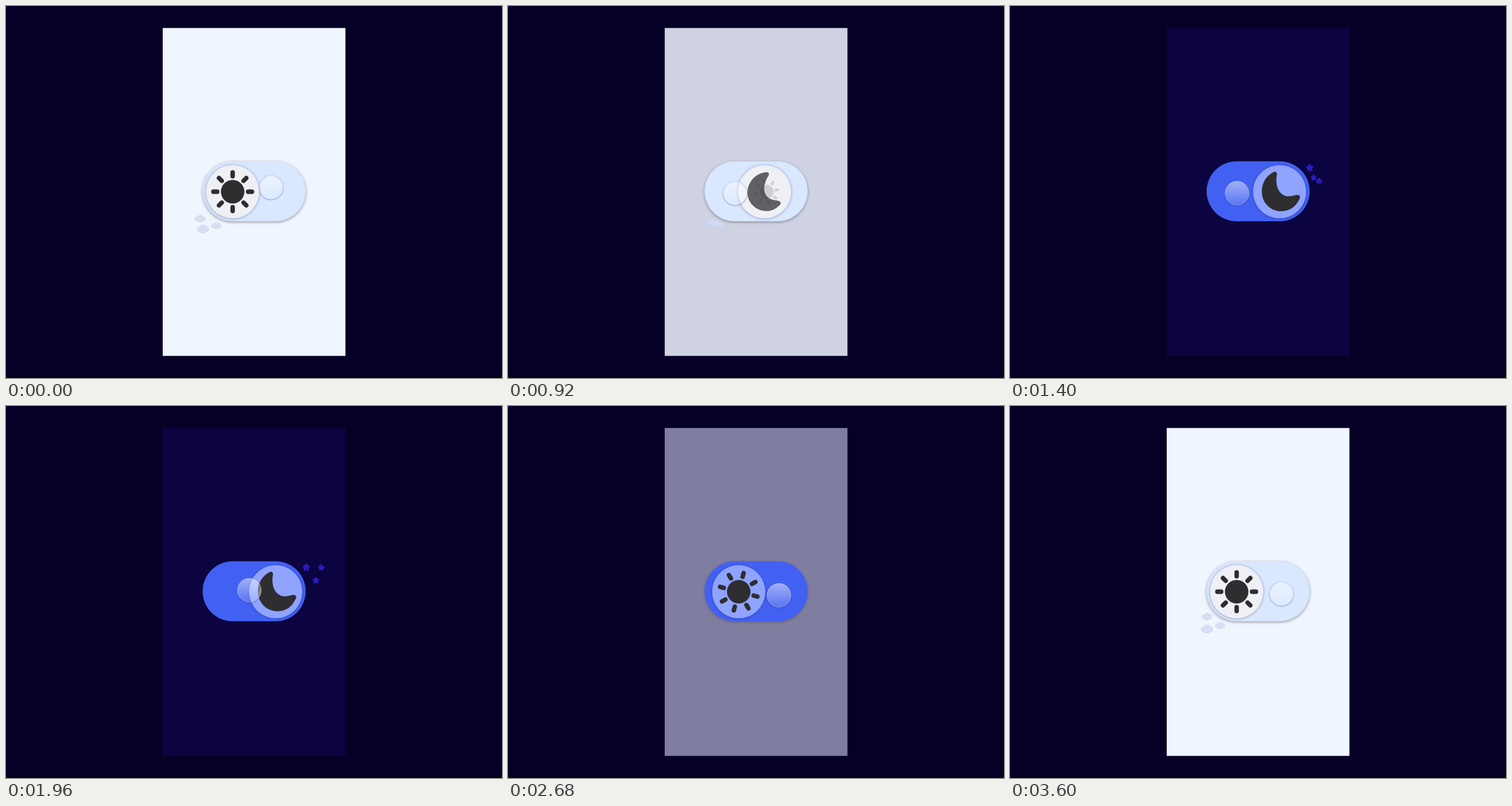
An HTML page with a canvas for the animation above (3.64 s loop, 864 px wide and 648 px high).

```html
<!DOCTYPE html>
<html lang="en">
<head>
<meta charset="utf-8">
<title>Day and night switch</title>
<style>
html, body { margin: 0; width: 100%; height: 100%; overflow: hidden; background: #060026; }
canvas { display: block; }
</style>
</head>
<body>
<canvas id="stage" width="864" height="648"></canvas>
<script>
const ctx = document.getElementById('stage').getContext('2d');
const LOOP = 3640, TO_NIGHT = 800, TO_DAY = 2440;
const INK = '#2e2d30';

const clamp = v => Math.max(0, Math.min(1, v));
const smooth = v => (1 - Math.cos(Math.PI * clamp(v))) / 2;
const mix = (a, b, k) => a + (b - a) * k;
const rgb = (a, b, k) => `rgb(${a.map((v, i) => Math.round(mix(v, b[i], k)))})`;
const glide = age => age < 0 ? 0 : 1 - Math.exp(-0.0098 * age);
const spring = age => age < 0 ? 0 : 1 - Math.exp(-0.0035 * age) * Math.cos(age * Math.PI / 200);

const moon = new Path2D('M-11-34C-6-37-4-32-5-28C-8-10-1 7 15 8C22 8 26 6 31 5.5' +
  'C36 5.5 37 10 34 14C28 27 17 34 3 34C-16 34-31 19-31-1C-31-15-23-28-11-34Z');

const sun = new Path2D();
sun.arc(0, 0, 20.5, 0, 7);
const ray = new Path2D();
ray.roundRect(-3.9, -37.5, 7.8, 14.5, 3.9);
for (let a = 0; a < 360; a += 45) sun.addPath(ray, new DOMMatrix().rotate(a));

const cloud = new Path2D();
for (const [x, y, rx, ry] of [[-.24, .02, .26, .2], [.02, -.1, .27, .23], [.27, 0, .23, .22], [.02, .12, .34, .21]]) {
  cloud.moveTo(x + rx, y);
  cloud.ellipse(x, y, rx, ry, 0, 0, 7);
}

const star = new Path2D();
for (let i = 0; i < 10; i++) {
  const r = i % 2 ? 0.55 : 0.9, a = i * Math.PI / 5 - Math.PI / 2;
  star.lineTo(r * Math.cos(a), r * Math.sin(a));
}
star.closePath();

// home x, y, hidden x, y, size, appearance time
const clouds = [
  [338, 370, 368, 348, 18, 3160],
  [343, 388, 362, 374, 21, 2900],
  [366, 382, 371, 380, 17, 2900]
];
const stars = [
  [522, 282, 504, 296, 6.8, 1300],
  [545, 285, 505, 320, 5.8, 1335],
  [538, 305, 508, 322, 5.8, 1300]
];

function place(path, x, y, turn, size) {
  const placed = new Path2D();
  placed.addPath(path, new DOMMatrix().translate(x, y).rotate(turn).scale(size));
  return placed;
}

function fill(path, style, alpha = 1) {
  ctx.globalAlpha = alpha;
  ctx.fillStyle = style;
  ctx.fill(path);
  ctx.globalAlpha = 1;
}

function shadowed(color, blur, y, draw) {
  ctx.save();
  ctx.shadowColor = color;
  ctx.shadowBlur = blur;
  ctx.shadowOffsetY = y;
  draw();
  ctx.restore();
}

function circle(x, y, r) {
  const path = new Path2D();
  path.arc(x, y, r, 0, 7);
  return path;
}

function scatter(items, t, leave, paint) {
  for (const [x, y, hx, hy, size, start] of items) {
    const shown = t >= start || (start > leave && t < leave + 400);
    if (!shown) continue;
    const enter = t >= start ? spring(t - start) : 1;
    const gone = start > leave && t >= start ? -1 : t - leave;
    const out = glide(gone);
    const alpha = 1 - clamp((gone - 100) / 120);
    const k = enter * (1 - out);
    const grow = Math.min(1, 0.3 + enter) * (1 - out * 0.2);
    if (alpha) paint(mix(hx, x, k), mix(hy, y, k), size * grow, alpha);
  }
}

function cursorAt(t) {
  const arc = (a, c, b, k) => (1 - k) ** 2 * a + 2 * k * (1 - k) * c + k * k * b;
  if (t < 1720) {
    const k = 1 - (1 - clamp(t / 540)) ** 2;
    return [arc(462, 430, 395.5, k), arc(316, 288, 326, k)];
  }
  if (t < 3400) {
    const k = smooth((t - 1720) / 580);
    return [arc(395.5, 434, 472, k), arc(326, 314, 329.7, k)];
  }
  const k = clamp((t - 3400) / 200) ** 2;
  return [472 + k, 329.7 - 2.7 * k];
}

function drawCursor(x, y, icons) {
  const disc = circle(x, y, 21);
  const shade = (top, bottom) => {
    const g = ctx.createLinearGradient(0, y - 21, 0, y + 21);
    g.addColorStop(0, top);
    g.addColorStop(1, bottom);
    return g;
  };
  ctx.strokeStyle = 'rgba(40,60,130,.3)';
  ctx.lineWidth = 1.4;
  shadowed('rgba(30,45,110,.3)', 3, 1, () => ctx.stroke(circle(x, y + .5, 21)));
  fill(disc, shade('rgba(255,255,255,.5)', 'rgba(255,255,255,.12)'));
  ctx.save();
  ctx.clip(disc);
  for (const [path, alpha] of icons) fill(path, shade('#555', '#a2a2a2'), alpha);
  ctx.restore();
  ctx.strokeStyle = 'rgba(255,255,255,.35)';
  ctx.lineWidth = 1;
  ctx.stroke(circle(x, y, 20.6));
}

function draw(t) {
  const toNight = t >= TO_NIGHT && t < 1800;
  const back = t >= TO_DAY;
  const age = t - (back ? TO_DAY : TO_NIGHT);
  const dark = v => back ? 1 - v : v;
  const moved = glide(age);
  const slide = dark(moved);
  const tone = dark(smooth(age / 480));
  const tint = dark(smooth((age - 330) / 270));

  ctx.fillStyle = '#060026';
  ctx.fillRect(0, 0, 864, 648);
  ctx.fillStyle = '#020012';
  ctx.fillRect(0, 645, 864, 3);
  ctx.fillStyle = rgb([240, 246, 255], [12, 4, 64], tone);
  ctx.fillRect(273, 38.3, 318.3, 571.2);

  scatter(clouds, t, TO_NIGHT, (x, y, size, alpha) => {
    fill(place(cloud, x, y + .7, 0, size), '#c3cde6', alpha);
    fill(place(cloud, x, y - .3, 0, size), toNight ? '#d1ddf6' : '#d7dff3', alpha);
  });
  if (t < TO_DAY + 300) {
    scatter(stars, t, TO_DAY, (x, y, size, alpha) => {
      const shape = place(star, x, y, 0, size);
      ctx.globalAlpha = alpha;
      ctx.strokeStyle = '#251dbe';
      ctx.lineWidth = 1.6;
      ctx.lineJoin = 'round';
      ctx.stroke(shape);
      fill(shape, '#251dbe', alpha);
    });
  }

  const track = new Path2D();
  track.roundRect(342.5, 270.5, 179.5, 104.5, 52.25);
  shadowed(`rgba(0,0,0,${.4 - .3 * tone})`, 5, 1.5, () =>
    fill(track, rgb([217, 231, 255], [66, 97, 242], tint)));

  const kx = mix(394.8, 469.8, slide), ky = 323.5;
  shadowed('rgba(20,30,90,.4)', 5, .5, () =>
    fill(circle(kx, ky, 46.2), rgb([239, 240, 245], [143, 163, 255], tint)));

  const sunTurn = back ? -17 + 35 * moved + 27 * smooth((age - 460) / 400) : 50 * slide;
  const sunSize = back ? 1 : 1 - .58 * slide;
  const sunAlpha = back ? clamp(1.12 * moved) : (1 - slide) ** 1.5;
  const moonAlpha = back ? 1 - clamp(1.12 * moved) : clamp(1.05 * slide);
  const icons = [
    [place(sun, kx + (back ? 0 : 5 * slide), ky, sunTurn, sunSize), sunAlpha],
    [place(moon, kx, ky, 75 * (1 - slide), .85 + .15 * slide), moonAlpha]
  ];
  for (const [path, alpha] of icons) fill(path, INK, alpha);

  drawCursor(...cursorAt(t), icons);
}

function tick(now) {
  draw(now % LOOP);
  requestAnimationFrame(tick);
}
draw(0);
requestAnimationFrame(tick);
</script>
</body>
</html>
```
